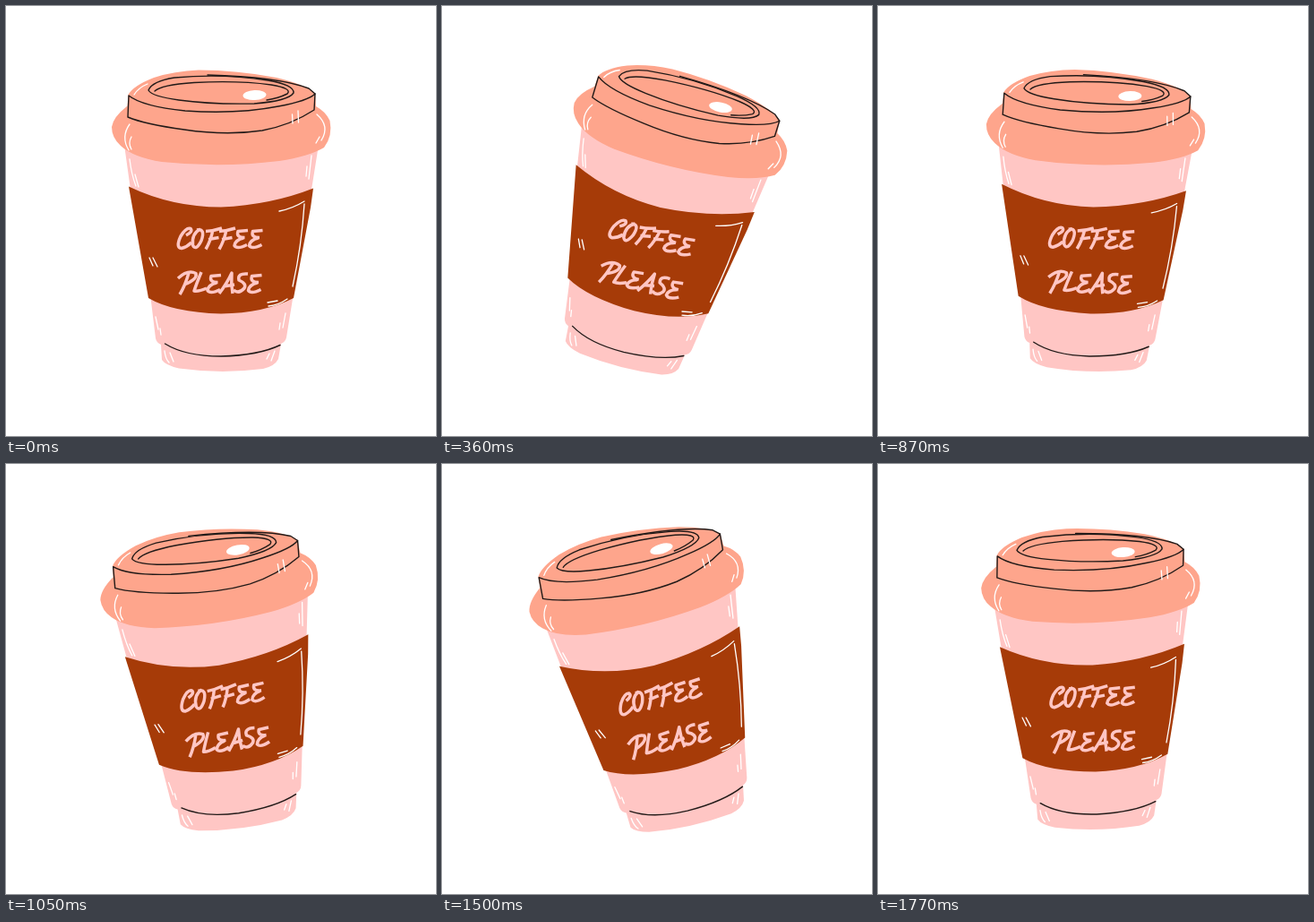
An HTML page that plays this animation: 480x480 px, repeating every 1.8 s.

```html
<!DOCTYPE html>
<html lang="en">
<head>
<meta charset="utf-8">
<title>Coffee please</title>
<style>
  html, body { margin: 0; width: 100%; height: 100%; overflow: hidden; background: #fff; }
  svg { display: block; width: 100vw; height: 100vh; }
  .line { fill: none; stroke-linecap: round; stroke-linejoin: round; }
  .ink { stroke: #211a18; stroke-width: 1.4; }
  .shine { stroke: #fff; stroke-width: 1.3; }
  .brush { stroke: #ffc6c4; stroke-width: 3.5; stroke-linecap: butt; }
</style>
</head>
<body>
<svg viewBox="0 0 480 480" role="img" aria-label="Takeaway cup that reads: Coffee please">
  <defs>
    <path id="e" d="M270 250.500L259 251.500Q256.500 258.500 266.500 258.500M265 259Q256 261 255 267.500Q258 272 269 266.500"/>
    <path id="f" d="M231 250Q228.500 262 223 271.500M223 251.500Q232 251 241 248M226 260.500L237.500 258.500"/>
  </defs>
  <g id="cup">
    <!-- body -->
    <path fill="#ffc6c4" d="M132 155L139 205L162 330L167 371Q168 376 173 378L174 395Q178 401 193 404.500Q240 411 287 405Q300 402 304 394L307 377Q312 375 313 370L320 327L341 205L349 155Z"/>
    <!-- sleeve -->
    <path fill="#a63b08" d="M137 201.500Q185 224.500 240 224.500Q296 222 343 203.500L340 225L321 326Q288 343 240 343.500Q186 342 159 326Z"/>
    <!-- lid -->
    <path fill="#fea58c" d="M136.500 99Q142 89 165 80Q188 72.500 215 71.500Q258 71.500 302 80Q335 88 345 97.500L346 112Q357 118 361.500 128Q365 145 355 158Q338 168 305 173Q240 181 174 174Q142 169 128 156Q118 147 118 135Q119.500 124 135.500 111.500Z"/>
    <g class="line ink">
      <path d="M137 100Q152 112 200 117Q258 121 304 112Q337 106 345 98L344 116Q318 133 286 139Q246 145 199 138Q155 132 136 124Z"/>
      <path d="M225 77Q304 79 338 92L345 98"/>
      <path d="M159 94Q163 84 188 80Q242 75 292 83Q322 88 321 97Q315 106 277 109Q229 110 193 105Q163 101 159 94Z"/>
      <path d="M166 95Q173 88 210 85.500Q260 83 296 88Q320 92 314 98Q304 103 291 105"/>
      <path d="M177.500 377Q200 391 240 391Q282 390 306 378.500"/>
    </g>
    <ellipse cx="277.500" cy="99.500" rx="13" ry="5.500" fill="#fff" transform="rotate(-3 277.500 99.500)"/>
    <g class="line shine">
      <path d="M143 99Q148 91 158 87M319.500 121L320 131M326 117L326.500 130"/>
      <path d="M138 132Q128 146 137 161M140 146Q136 153 140 160M347 121Q362 134 352 150M350 146L346 153"/>
      <path d="M138 171Q140 188 145 201M144 188L148 202M341 167L338 193M336 179L335 190"/>
      <path d="M305 229Q320 226 333 218M333 221Q330 268 320 313M293 335Q304 334 314 327M292 331L303 329"/>
      <path d="M160 281L164 290M164 281L169 291"/>
      <path d="M167 347L170 361M172 360L173 367M312 343L309 359M306 354L305 361"/>
      <path d="M177 385Q178 394 182 398M183 387L187 397M300 385L296 396M294 388L291 394"/>
    </g>
    <g class="line brush">
      <path d="M201 256Q209 252 206 248.500Q201 247 195 257Q189 270 196 270.500Q202 269 207 264"/>
      <path d="M217 249Q207 254 208.500 267Q212 274 218 262Q223 248 213 250"/>
      <use href="#f"/>
      <use href="#f" x="15"/>
      <use href="#e"/>
      <use href="#e" x="16.500"/>
      <path d="M204 298Q200 312 194 322M192 304Q203 294 212 298.500Q214 305 199 311"/>
      <path d="M218 297Q213 309 210 318Q215 319 224 315"/>
      <use href="#e" x="-30" y="50"/>
      <path d="M238 321Q247 309 252 298Q251 310 253 321M243 313L255 311"/>
      <path d="M270 299Q258 298 260 306Q269 310 266 315Q260 322 254 317"/>
      <use href="#e" x="15.500" y="50"/>
    </g>
  </g>
</svg>
<script>
  const LOOP = 1800, STEP = 30, SWING = 15;
  const cup = document.getElementById("cup");
  const start = performance.now();

  function draw(ms) {
    const time = Math.floor((ms % LOOP) / STEP) * STEP;
    const angle = SWING * Math.sin(2 * Math.PI * time / LOOP);
    cup.setAttribute("transform", `rotate(${angle.toFixed(3)} 240 240)`);
  }

  function tick() {
    draw(performance.now() - start);
    requestAnimationFrame(tick);
  }
  tick();
</script>
</body>
</html>
```
